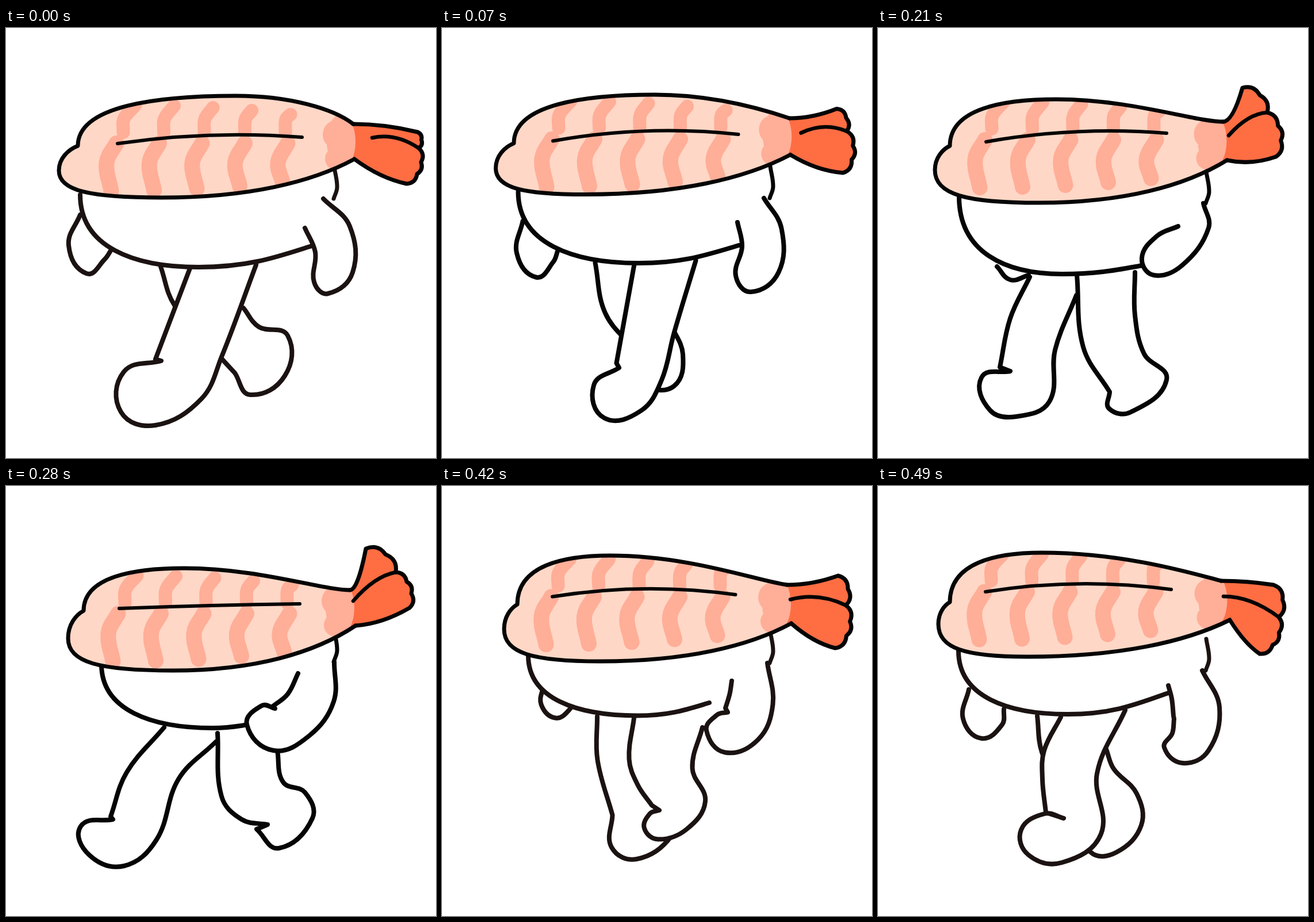
An HTML page with a canvas for the animation above (0.56 s loop, 748x748 px).

```html
<!DOCTYPE html>
<html lang="en">
<head>
<meta charset="utf-8">
<title>Walking shrimp sushi</title>
<style>
html, body { margin: 0; width: 100%; height: 100%; overflow: hidden; background: #fff; }
canvas { display: block; }
</style>
</head>
<body>
<canvas id="stage" width="748" height="748"></canvas>
<script>
const ctx = document.getElementById('stage').getContext('2d');
const STEP = 70, BROWN = '#1b1312', BLACK = '#050505';
const PALE = '#ffd7c6', PINK = '#ffae98', ORANGE = '#ff6d43';

// Key points per pose; "!" marks a corner.
// head: tail joint, apex, notch, left end, lowest point, lower joint
// tail: upper tip, cleft, lower tip, start of the inner line
// dip: how round the back is before the tail; rise: bow of the seam
const strideBack = {
  ink: BROWN, dip: 27, rise: 9,
  head: '604,167 400,118 125,205 92,248 270,295 606,228',
  tail: '716,181 718,209 697,271 637,191',
  seam: '194,201 515,190',
  body: '129,290 335,416 535,378',
  farArm: '129,325 109,378 140,427 172,402 183,386',
  nearArm: '552,297 598,345 603,425 560,462 536,442 538,390 520,348',
  nearLeg: '320,418 260,576! 270,579! 205,598 200,668 260,691 340,645 375,572 435,412',
  farLeg: '269,415 293,482 375,575 398,600! 425,638 485,605 490,535 440,520 413,487'
};
const upright = {
  ink: BLACK, dip: 0, rise: 14,
  head: '605,147 340,114 125,196 95,240 230,284 606,213',
  tail: '657,100 690,150 698,233 612,174',
  seam: '192,192 516,180',
  body: '136,280 350,402 498,378',
  farArm: '152,347 151,405 187,440 215,412 220,388',
  nearArm: '568,295 583,352 568,425 515,456 486,420 506,370 508,328',
  nearLeg: '349,404 347,590! 346,603! 323,645 365,689 433,640 424,580 432,490 448,397',
  farLeg: '264,402 275,510 295,545 300,560! 281,600 322,641 348,600 352,500 352,410'
};
const stepOut = {
  ink: BLACK, dip: 0, rise: 10,
  head: '600,163 310,124 125,205 99,247 280,304 607,230',
  tail: '634,104 677,147 692,224 610,187',
  seam: '188,198 502,183',
  body: '141,293 320,428 460,413',
  farArm: '207,415 230,438 262,430',
  nearArm: '566,305 575,348 530,412 480,430 459,400 485,362 522,345',
  nearLeg: '346,430 357,555 403,633! 402,662 440,668 502,612 463,567 447,500 447,425',
  farLeg: '264,433 230,505 212,590! 230,597! 180,608 195,665 240,676 298,650 308,560 345,465'
};
const strideFront = {
  ink: BLACK, dip: 0, rise: 1,
  head: '598,181 310,143 135,217 108,265 290,321 608,243',
  tail: '626,109 678,150 702,212 604,200',
  seam: '197,213 511,205',
  body: '166,310 360,421 415,416',
  farArm: '',
  nearArm: '571,306 570,375 528,434 465,460 419,415 445,382 468,387! 463,384! 490,362 508,326',
  nearLeg: '368,430 375,540 410,580 455,589! 436,597! 475,630 533,578 520,533 482,515 472,460',
  farLeg: '275,420 210,498 182,575! 186,580! 130,592 145,642 205,661 262,615 300,510 365,445'
};
const kickUp = {
  ink: BLACK, dip: 0, rise: 12,
  head: '604,179 300,126 137,210 111,258 290,313 603,245',
  tail: '690,140 708,187 704,272 611,203',
  seam: '197,201 511,198',
  body: '160,303 350,402 425,394',
  farArm: '195,340 197,355 215,368 230,360 235,355',
  nearArm: '568,295 557,375 525,422 455,445 422,395 445,366 479,382! 472,373! 490,353 503,331',
  nearLeg: '350,405 362,490 395,530 438,543! 433,550! 433,570 455,593 490,587 530,540 528,492 490,482 476,450',
  farLeg: '263,402 256,490 263,585! 220,620 262,661 340,628 347,605 344,540 355,475'
};
const passing = {
  ink: BROWN, dip: 14, rise: 12,
  head: '597,165 285,116 125,202 105,240 260,297 612,233',
  tail: '688,172 697,228 664,292 601,192',
  seam: '187,184 510,180',
  body: '140,287 330,397 505,360',
  farArm: '158,354 148,405 180,439 216,415 219,388',
  nearArm: '564,321 594,385 575,460 530,482 498,455 512,430 515,405! 514,400! 511,370 505,347',
  nearLeg: '318,402 289,460 286,510 292,568! 323,578! 290,570 249,598 262,642 320,655 388,605 381,500 430,390',
  farLeg: '277,400 285,463 330,560! 370,637 415,637 458,590 450,535 410,492 397,458'
};

// Corners become doubled points, which break the tangent there.
const parseCurve = text => text.split(' ').filter(Boolean).flatMap(item => {
  const point = item.split(',').map(parseFloat);
  return item.endsWith('!') ? [point, point] : [point];
});

const parsePose = pose => Object.fromEntries(Object.entries(pose).map(([name, value]) =>
  [name, typeof value === 'string' && name !== 'ink' ? parseCurve(value) : value]));

function between(a, b) {
  if (typeof a === 'number') return (a + b) / 2;
  if (Array.isArray(a)) return a.map((item, i) => between(item, b[i]));
  if (typeof a === 'string') return b;
  return Object.fromEntries(Object.keys(a).map(key => [key, between(a[key], b[key])]));
}

// The point at fraction (u, v) of the box spanned by two points.
const within = ([x0, y0], [x1, y1], u, v = u) => [x0 + (x1 - x0) * u, y0 + (y1 - y0) * v];

function smoothPath(points) {
  const path = new Path2D(), last = points.length - 1;
  const at = i => points[Math.max(0, Math.min(last, i))];
  const tangent = i => {
    const [x0, y0] = at(i - 1), [x1, y1] = at(i + 1);
    const length = Math.hypot(x1 - x0, y1 - y0) || 1;
    return [(x1 - x0) / length, (y1 - y0) / length];
  };
  if (last > 0) path.moveTo(...points[0]);
  for (let i = 0; i < last; i++) {
    const p = at(i), q = at(i + 1), u = tangent(i), v = tangent(i + 1);
    const reach = Math.hypot(q[0] - p[0], q[1] - p[1]) * 0.37;
    path.bezierCurveTo(p[0] + u[0] * reach, p[1] + u[1] * reach,
      q[0] - v[0] * reach, q[1] - v[1] * reach, ...q);
  }
  return path;
}

function bowTo(path, from, to, lift) {
  const [x, y] = within(from, to, 0.5);
  path.quadraticCurveTo(x, y - lift, ...to);
}

function bow(from, to, lift) {
  const path = new Path2D();
  path.moveTo(...from);
  bowTo(path, from, to, lift);
  return path;
}

function headPath({ head: [joint, apex, notch, left, low, lowJoint], dip }) {
  const path = new Path2D();
  const curve = (a, b, end) => path.bezierCurveTo(...a, ...b, ...end);
  const [x, y] = within(apex, joint, 0.83, 1);
  path.moveTo(...joint);
  curve([x, y - dip], within(apex, joint, 0.45, 0), apex);
  curve(within(notch, apex, 0.5, 1), within(notch, apex, 0, 0.8), notch);
  curve(within(notch, left, 0.5, 0.15), within(notch, left, 1, 0.5), left);
  curve(within(left, low, 0, 0.75), within(left, low, 0.3, 1), low);
  curve(within(low, lowJoint, 0.45, 0), within(low, lowJoint, 0.78, 0.4), lowJoint);
  return path;
}

// A bulging fin edge made of equal bumps.
function scallop(path, from, to, bumps) {
  const dx = to[0] - from[0], dy = to[1] - from[1];
  const edge = t => {
    const bulge = 0.8 * t * (1 - t);
    return [from[0] + dx * t + dy * bulge, from[1] + dy * t - dx * bulge];
  };
  for (let i = 0; i < bumps; i++) {
    const p = edge(i / bumps), q = edge((i + 1) / bumps), [x, y] = within(p, q, 0.5);
    path.quadraticCurveTo(x + (q[1] - p[1]) * 0.4, y - (q[0] - p[0]) * 0.4, ...q);
  }
}

function tailPath({ head, tail: [tip, cleft, lowTip] }) {
  const path = new Path2D(), joint = head[0], lowJoint = head[5];
  path.moveTo(...joint);
  path.quadraticCurveTo(...within(joint, tip, 0.5, 0), ...tip);
  scallop(path, tip, cleft, 2);
  scallop(path, cleft, lowTip, 3);
  bowTo(path, lowTip, lowJoint, -12);
  return path;
}

function bodyPath([start, low, end]) {
  const path = new Path2D();
  path.moveTo(...start);
  path.bezierCurveTo(...within(start, low, 0, 0.72), ...within(start, low, 0.45, 1), ...low);
  path.bezierCurveTo(...within(low, end, 0.45, 0), ...within(low, end, 0.7, 0.5), ...end);
  return path;
}

function stroke(path, color, width) {
  ctx.strokeStyle = color;
  ctx.lineWidth = width;
  ctx.stroke(path);
}

function fill(path, color) {
  ctx.fillStyle = color;
  ctx.fill(path);
}

function drawStripes([[x0, y0], [, y1]], rise) {
  const y = (y0 + y1) / 2 - rise;
  for (let i = 0; i < 5; i++) {
    const x = x0 - 19 + 74.5 * i;
    stroke(smoothPath([[x + 50 - 7 * i, y - 52 + i * i], [x + 30 - 4 * i, y - 28],
      [x + 29 - 4 * i, y - 5]]), PINK, 23);
    stroke(smoothPath([[x + 17, y + 14], [x, y + 48], [x + 8, y + 97 - i * i]]), PINK, 27);
  }
}

// Two scallops to the left and a rounded edge towards the tail.
function drawBand([x0, y0], [x1, y1]) {
  const x = (x0 + x1) / 2, y = (y0 + y1) / 2, band = new Path2D();
  ctx.fillStyle = ORANGE;
  ctx.fillRect(x - 8, 0, 200, 748);
  for (const [dx, dy, rx, ry] of [[-22, 0, 25, 48], [-28, -12, 26, 26], [-30, 30, 20, 20]]) {
    band.moveTo(x + dx + rx, y + dy);
    band.ellipse(x + dx, y + dy, rx, ry, 0, 0, Math.PI * 2);
  }
  fill(band, PINK);
}

function drawPose(pose) {
  const { ink, head: outline, tail: fins, nearArm, seam, rise } = pose;
  ctx.fillStyle = '#fff';
  ctx.fillRect(0, 0, 748, 748);
  ctx.lineCap = ctx.lineJoin = 'round';

  const part = path => { fill(path, '#fff'); stroke(path, ink, 8); };
  for (const limb of [pose.farLeg, pose.nearLeg, pose.farArm]) part(smoothPath(limb));
  part(bodyPath(pose.body));
  const shoulder = nearArm[0][1];
  stroke(smoothPath([[571, shoulder - 55], [576, shoulder - 20], [570, shoulder]]), ink, 7);
  part(smoothPath(nearArm));

  const head = headPath(pose), tail = tailPath(pose), shrimp = new Path2D(head);
  shrimp.addPath(tail);
  fill(tail, ORANGE);
  fill(head, PALE);
  ctx.save();
  ctx.clip(shrimp);
  drawStripes(seam, rise);
  drawBand(outline[0], outline[5]);
  ctx.restore();

  stroke(head, BLACK, 7);
  stroke(tail, BLACK, 7);
  stroke(bow(fins[3], fins[1], 18), BLACK, 6.5);
  stroke(bow(...seam, rise * 2), BLACK, 6);
}

const [back, up, out, front, kick, pass] =
  [strideBack, upright, stepOut, strideFront, kickUp, passing].map(parsePose);
const cycle = [back, between(back, up), up, out, front, kick, between(kick, pass), pass];

function animate() {
  drawPose(cycle[Math.floor(performance.now() / STEP) % cycle.length]);
  requestAnimationFrame(animate);
}
animate();
</script>
</body>
</html>
```
